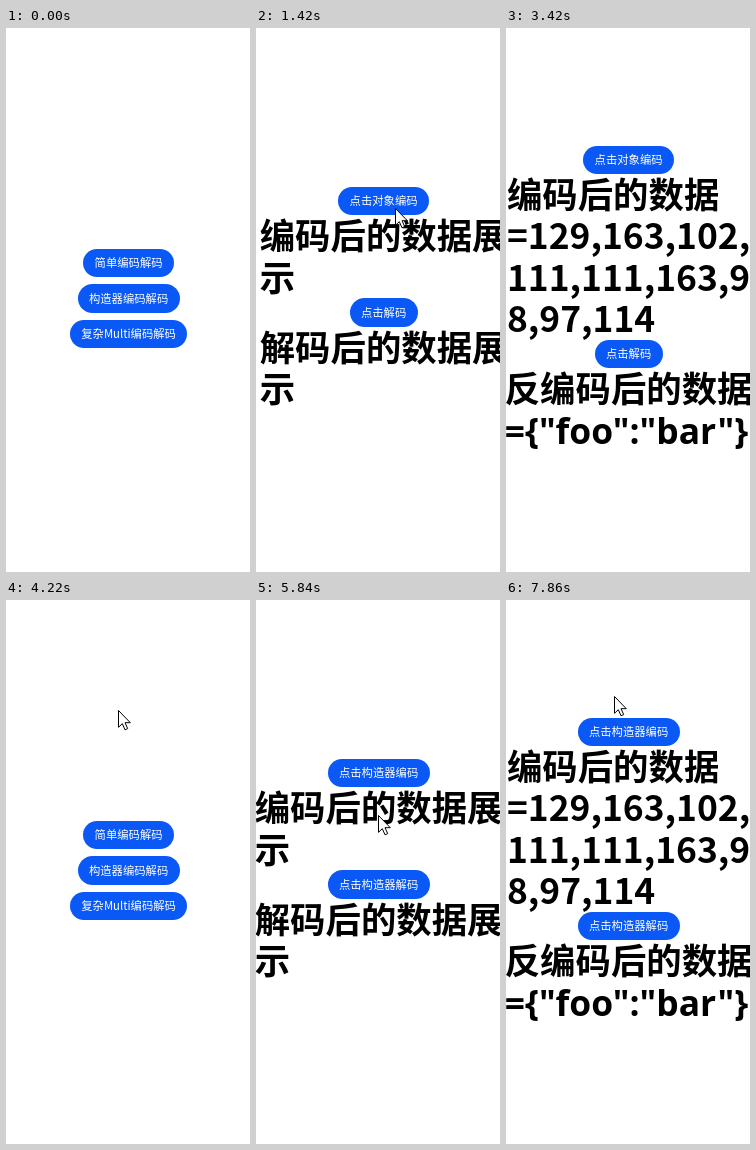
An HTML page that plays this animation: 244x544 px, repeating every 8000 ms.

```html
<!DOCTYPE html>
<html lang="zh-CN">
<head>
<meta charset="utf-8">
<title>编码解码</title>
<style>
  html, body { margin: 0; width: 100%; height: 100%; overflow: hidden; background: #fff; }
  body { position: relative; font-family: "Noto Sans CJK SC", "Noto Sans CJK", sans-serif; }
  main {
    position: absolute; left: -20px; width: 285.2px; height: 540.9px;
    display: flex; flex-direction: column; align-items: center; justify-content: center;
  }
  main.menu { gap: 7.08px; }
  .button {
    flex: none; height: 28.33px; padding: 0 11.33px; border-radius: 15px;
    background: #0a59f7; color: #fff; white-space: pre;
    font-size: 11.33px; font-weight: 500; line-height: 28.33px;
  }
  .pressed { background: #0950de; }
  .button span, .result { position: relative; top: -.056em; }
  .result {
    flex: none; white-space: pre; color: #000;
    font-size: 35.4px; font-weight: 700; line-height: 41.5px;
  }
  .json { font-family: "Noto Sans", sans-serif; line-height: 0; }
  svg { position: absolute; left: 0; top: 0; overflow: visible; }
</style>
</head>
<body>
<main></main>
<svg width="14" height="21">
  <circle cx="16.5" cy="-1" r="5.5" fill="none" stroke="#3a9be6" stroke-width="3"/>
  <path d="M.5 .5V17.3L4.3 13.7 7 19.8 9.7 18.6 7 12.7H12.3Z" fill="#fff" stroke="#000"/>
</svg>
<script>
const LOOP = 8000;
const ENCODED = '编码后的数据\n=129,163,102,\n111,111,163,9\n8,97,114';
const DECODED = '反编码后的数据\n<span class="json">={"foo":"bar"}</span>';
const waiting = verb => `${verb}码后的数据展\n示`;

const button = (label, pressed) =>
  `<div class="button${pressed ? ' pressed' : ''}"><span>${label}</span></div>`;
const result = text => `<div class="result">${text}</div>`;

const menu = pressed =>
  ['简单编码解码', '构造器编码解码', '复杂Multi编码解码']
    .map((label, i) => button(label, i === pressed)).join('');

// stage: 0 nothing converted, 1 encoded, 2 encoded and decoded
const codec = (labels, stage) => pressed =>
  button(labels[0], pressed === 0) + result(stage > 0 ? ENCODED : waiting('编')) +
  button(labels[1], pressed === 1) + result(stage > 1 ? DECODED : waiting('解'));

const simple = [0, 1, 2].map(s => codec(['点击对象编码', '点击解码'], s));
const builder = [0, 1, 2].map(s => codec(['点击构造器编码', '点击构造器解码'], s));

// [start ms, screen, pointer position or null, extras]
const steps = [
  [0, menu, null],
  [200, menu, [182, 284]],
  [400, menu, [168, 266]],
  [600, menu, [150, 244]],
  [800, menu, [145, 236], { pressed: 0 }],
  [1000, menu, [145, 235], { pressed: 0 }],
  [1220, menu, [141, 189]],
  [1420, simple[0], [139, 180], { shift: 5 }],
  [1620, simple[0], [138, 179], { pressed: 0 }],
  [1820, simple[1], [138, 181]],
  [2020, simple[1], [134, 198]],
  [2220, simple[1], [127, 270]],
  [2420, simple[1], [124, 324], { pressed: 1 }],
  [2620, simple[2], [124, 325]],
  [2820, simple[2], [122, 290]],
  [3020, simple[2], [120, 150]],
  [3220, simple[2], [118, 1]],
  [3420, simple[2], null],
  [4020, menu, [118, 1]],
  [4220, menu, [112, 110]],
  [4440, menu, [105, 270]],
  [5040, menu, [102, 293]],
  [5240, menu, [110, 275]],
  [5440, menu, [114, 268], { pressed: 1 }],
  [5640, builder[0], [116, 250]],
  [5840, builder[0], [122, 215]],
  [6040, builder[0], [127, 186]],
  [6240, builder[0], [128, 178]],
  [6440, builder[0], [128, 177], { pressed: 0, busy: true }],
  [6640, builder[1], [128, 180]],
  [6840, builder[1], [122, 250]],
  [7040, builder[1], [114, 315]],
  [7240, builder[1], [112, 324], { pressed: 1 }],
  [7640, builder[2], [110, 250]],
  [7860, builder[2], [108, 96]]
];

const page = document.querySelector('main');
const pointer = document.querySelector('svg');
const ring = pointer.querySelector('circle');
const start = performance.now();
let current;

function show([, screen, position, { pressed, shift = 0, busy } = {}]) {
  page.className = screen === menu ? 'menu' : '';
  page.innerHTML = screen(pressed);
  page.style.transform = `translateX(${shift}px)`;
  pointer.style.display = position ? '' : 'none';
  ring.style.display = busy ? '' : 'none';
  if (position) pointer.style.transform = `translate(${position[0]}px, ${position[1]}px)`;
}

function tick() {
  const time = (performance.now() - start) % LOOP;
  const step = steps.findLast(([from]) => from <= time);
  if (step !== current) show(current = step);
  requestAnimationFrame(tick);
}
tick();
</script>
</body>
</html>
```
